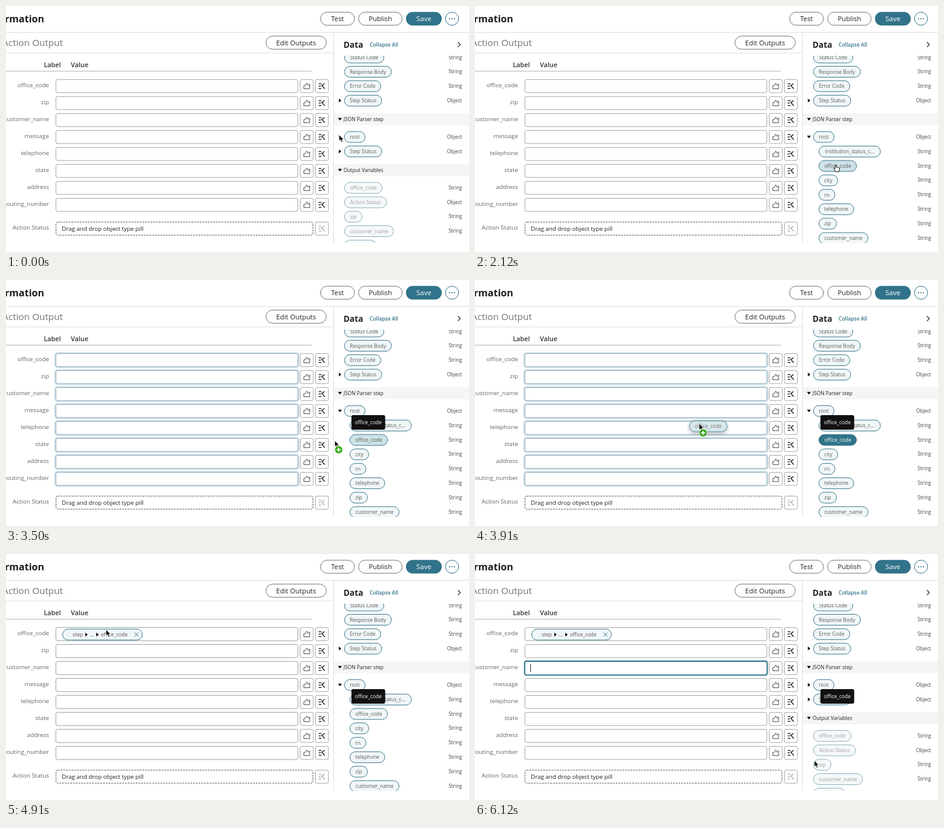
Recreate the animation shown at these times as an HTML page. Size 764 by 406 pixels, loop 6160 ms.

```html
<!DOCTYPE html>
<html lang="en">
<head>
<meta charset="utf-8">
<title>Action output mapping</title>
<style>
  html, body { margin: 0; width: 100%; height: 100%; overflow: hidden; background: #fff; }
  svg { display: block; font-family: "Open Sans", "Noto Sans", sans-serif; }
  .line { fill: none; stroke: #dedede; }
  .button { fill: #fff; stroke: #666; stroke-width: .9; }
  .field { fill: #fff; stroke: #a6a6a6; }
  .icon { fill: none; stroke: #333; }
  .pill rect { fill: #f1f6f8; stroke: #39788d; }
  .pill text { fill: #5c5c5c; }
  .off { opacity: .6; }
  .hover rect { fill: #cfe2e8; }
  .dark rect { fill: #31738a; }
  .dark text { fill: #fff; }
</style>
</head>
<body>
<svg id="stage" width="764" height="406" viewBox="0 0 764 406"></svg>
<script>
const LOOP = 6160, TEAL = '#31738a', STEP = 23.8;
const rect = (x, y, w, h, r, attrs = '') =>
  `<rect x="${x}" y="${y}" width="${w}" height="${h}" rx="${r}" ${attrs}/>`;
const text = (s, x, y, size, fill = '#222', anchor = 'start', weight = 400) =>
  `<text x="${x}" y="${y}" font-size="${size}" fill="${fill}" text-anchor="${anchor}" font-weight="${weight}">${s}</text>`;
const path = (d, attrs = '') => `<path d="${d}" ${attrs}/>`;
const group = (id, body, attrs = '') => `<g id="${id}" ${attrs}>${body}</g>`;
const triRight = (x, y) => path(`M${x - 1.7} ${y - 3.2}v6.4l4-3.2z`);
const triDown = (x, y, attrs) => path(`M${x - 3.2} ${y - 2}h6.4l-3.2 4.2z`, attrs);

const button = (s, x, y, w) =>
  rect(x, y, w, 21.6, 10.8, 'class="button"') + text(s, x + w / 2, y + 14.8, 11.3, '#222', 'middle');

const pill = (s, x, y, w, cls = '') =>
  `<g class="pill ${cls}" data-box="${x},${y},${w}">${rect(x, y - 9, w, 18, 9)}${text(s, x + w / 2, y + 3, 8.4, '', 'middle')}</g>`;
const row = (s, type, x, y, w, cls) =>
  pill(s, x, y, w, cls) + text(type, 752.5, y + 2.6, 8.2, '#444', 'end');
const bar = (s, y, id) =>
  rect(541, y - 10, 223, 20, 0, `fill="#f5f5f6" id="${id}"`) + triDown(551, y) + text(s, 557, y + 3.2, 8.35);

const wand = (y, color) => rect(510.5, y - 10.8, 21.5, 21.6, 2.5, 'class="field"') +
  path(`M516 ${y - 4}h4.5M516 ${y}h3.5M516 ${y + 4}h4.5M520.5 ${y - 2}l5.5 6.5M525.5 ${y - 4.5}l-4 4`,
    `class="icon" style="stroke:${color}" stroke-width="1.6"`);
const chart = y => rect(485.5, y - 10.8, 21.5, 21.6, 2.5, 'class="field"') +
  path(`M491.5 ${y - .5}v5h9.5v-8l-2.4 2.5-2.2-4-2.2 3.8z`, 'class="icon" stroke-width=".9"');

const labels = ['office_code', 'zip', 'customer_name', 'message', 'telephone', 'state', 'address', 'routing_number'];
const fieldY = i => 132.2 + 28 * i;
const formRow = (s, i) => {
  const y = fieldY(i);
  return text(s, 71, y + 1.7, 9.85, '#666', 'end') +
    rect(80.8, y - 12, 402.4, 24, 4, 'class="halo" fill="none" stroke="#cfe0e8" stroke-width="2"') +
    rect(82.3, y - 10.8, 399.4, 21.6, 3, 'class="field input"') + chart(y) + wand(y, '#333');
};

const children = [['institution_status_c...', 101.5], ['office_code', 62], ['city', 31], ['rn', 26.5],
  ['telephone', 57.5], ['zip', 29], ['customer_name', 81]];
const outputs = [['office_code', 62], ['Action Status', 69.5, 'Object'], ['zip', 29], ['customer_name', 81], ['message', 52]];

const page =
  text('Information', 63, 27, 16, '#1c1c1c', 'end', 700) +
  text('Action Output', 94, 66, 15.3, '#757575', 'end') +
  button('Test', 519, 10.2, 56) + button('Publish', 581.8, 10.2, 72) + button('Edit Outputs', 429, 49.7, 99.5) +
  rect(660, 9.8, 59, 22.4, 11.2, `fill="${TEAL}"`) + text('Save', 689.5, 25, 11.5, '#fff', 'middle') +
  `<circle cx="736" cy="21" r="10.8" fill="#fff" stroke="${TEAL}"/>` +
  [732, 736, 740].map(x => `<circle cx="${x}" cy="21" r="1.1" fill="${TEAL}"/>`).join('') +
  path('M0 43.5H764M0 77.5H540M540.5 43V391', 'class="line"') +
  path('M0 107.5H505', 'class="line" style="stroke:#b5b5b5"') +
  text('Label', 62.5, 100.8, 10.8, '#333', 'start', 600) + text('Value', 107, 100.8, 10.8, '#333', 'start', 600) +
  labels.map(formRow).join('') +
  text('Action Status', 71, 369, 9.85, '#666', 'end') +
  rect(82.5, 356.7, 424, 21.5, 3, 'fill="#fff" stroke="#555" stroke-dasharray="3 1.5"') +
  text('Drag and drop object type pill', 92, 371.2, 9.8) + wand(367.5, '#b8b8b8') +
  text('Data', 557, 68.6, 13.6, '#222', 'start', 700) +
  text('Collapse All', 600, 66.7, 8.5, TEAL, 'start', 600) +
  path('M745.7 59.5l4 4.2-4 4.2', 'class="icon" stroke-width="1.3"');

const list =
  row('Status Code', 'String', 558.5, 85, 65) + row('Response Body', 'String', 558.5, 108.5, 77.5) +
  row('Error Code', 'String', 558.5, 132.3, 60) + row('Step Status', 'Object', 558.5, 156.2, 61.5) +
  triRight(551, 156) + bar('JSON Parser step', 186.8, 'jsonBar') + row('root', 'Object', 558.5, 216.2, 34) +
  group('closed', triRight(551, 216) + triRight(551, 240) + row('Step Status', 'Object', 558.5, 240, 61.5) +
    bar('Output Variables', 270.8, 'outBar') +
    outputs.map(([s, w, type = 'String'], i) => row(s, type, 558.5, 300.2 + STEP * i, w, 'off')).join('')) +
  group('open', triDown(551, 216, 'id="rootTri"') +
    children.map(([s, w], i) => row(s, 'String', 567.5, 240.2 + STEP * i, w)).join(''));

const dropped = rect(93.5, 124, 131.5, 18, 9, 'fill="#f1f6f8" stroke="#39788d"') +
  text('step', 110, 136, 8.4, '#555') + triRight(132.5, 133) + text('...', 138.5, 136, 8.4, '#555') +
  triRight(150.7, 133) + text('office_code', 156.5, 136, 8.4, '#555') +
  path('M212 129.7l6.6 6.6m0-6.6l-6.6 6.6', `stroke="${TEAL}"`);
const focus = rect(82, -11.2, 400, 22.6, 3, `fill="#fff" stroke="${TEAL}" stroke-width="1.8" filter="url(#glow)"`) +
  path('M91.7 -7v14', 'stroke="#222"');
const pointer =
  group('arrow', path('M0 0v10l2.3-2 1.8 4 1.8-.8-1.8-3.8h3.2z', 'fill="#000" stroke="#fff" stroke-width=".7"')) +
  group('hand', path('M-1 1q1-1.6 2 0v3.6q1-.9 1.8.2 1-.7 1.8.4 1.9-.5 1.9 1.2v2.4l-1.2 3.2h-5l-3.4-5q.2-1.4 1.7-.3l.4.5z',
    'fill="#fff" stroke="#000" stroke-width=".95" stroke-linejoin="round"')) +
  group('plus', '<circle cx="6.5" cy="15" r="6.3" fill="#35a816" stroke="#fff" stroke-width=".6"/>' +
    path('M6.5 11.5v7M3 15h7', 'stroke="#fff" stroke-width="1.8"'));

stage.innerHTML = `<defs><clipPath id="clip"><path d="M541 82H764V391H541z"/></clipPath>
  <filter id="glow" x="-5%" y="-50%" width="110%" height="200%"><feDropShadow dx="0" dy="0" stdDeviation="1.6" flood-color="#7fb9c9"/></filter>
  <filter id="shade" x="-30%" y="-70%" width="160%" height="260%"><feDropShadow dx="0" dy="2" stdDeviation="3" flood-opacity=".4"/></filter></defs>` +
  page + group('focus', focus) + group('dropped', dropped) + group('panel', list, 'clip-path="url(#clip)"') +
  group('tip', rect(570, 223, 55.7, 24, 3, 'fill="#111"') + text('office_code', 597.8, 238.2, 8.4, '#fff', 'middle')) +
  group('ghost', pill('office_code', -16, 4, 62, 'hover'), 'opacity=".82" filter="url(#shade)"') +
  group('pointer', pointer);

const $ = id => document.getElementById(id);
const show = (id, on) => { $(id).style.display = on ? '' : 'none'; };
const clamp = v => Math.max(0, Math.min(1, v));
const ramp = (t, a, b) => clamp((t - a) / (b - a));
const within = (t, a, b) => t >= a && t < b;
const pills = [...document.querySelectorAll('#panel .pill:not(.off)')];
const sourcePill = document.querySelectorAll('#open .pill')[1];
const halos = document.querySelectorAll('.halo'), inputs = document.querySelectorAll('.input');

// time, x, y, bend of the path leading there
const route = [[0, 550, 213, 0], [370, 550, 213, 0], [600, 551, 217, 0], [910, 551, 217, 0], [2120, 595, 261.5, 0],
  [3200, 595, 261.5, 0], [4580, 164.5, 124.5, 190], [4790, 164.5, 124.5, 0], [5300, 169, 127, 0],
  [5450, 169, 127, 0], [6040, 560, 341, 0], [LOOP, 560, 341, 0]];

function cursorAt(t) {
  const i = route.findIndex(k => k[0] > t);
  const [t0, x0, y0] = route[i - 1], [t1, x1, y1, bend] = route[i];
  const u = (t - t0) / (t1 - t0), s = u * u * (3 - 2 * u);
  return [x0 + (x1 - x0) * s, y0 + (y1 - y0) * s + bend * s * (1 - s)];
}

function draw(t) {
  const [x, y] = cursorAt(t);
  const open = within(t, 450, 5000), dragging = within(t, 3250, 4790), lifted = within(t, 3560, 4790);
  const onTri = within(t, 370, 1600) && x < 555;
  let hovered = null;

  show('open', open);
  show('closed', !open);
  for (const p of pills) {
    const [px, py, w] = p.dataset.box.split(',').map(Number);
    const hit = open && t < 3250 && p.closest('#closed') === null && x > px && x < px + w && Math.abs(y - py) < 9;
    if (hit) hovered = p;
    p.classList.toggle('hover', hit || (p === sourcePill && dragging));
  }
  sourcePill.classList.toggle('dark', lifted);
  $('rootTri').setAttribute('fill', onTri ? TEAL : '#000');
  $('outBar').setAttribute('fill', within(t, 5000, 5500) ? '#e1e2e6' : '#f5f5f6');

  const lit = ramp(t, 3040, 3250) * (1 - ramp(t, 4790, 4950));
  halos.forEach(h => h.setAttribute('opacity', lit));
  inputs.forEach(f => { f.style.stroke = lit > .5 ? '#86a6b6' : ''; });

  const overField = within(t, 4400, 4830), nextField = t >= 5700;
  show('focus', overField || nextField);
  $('focus').setAttribute('transform', `translate(0 ${fieldY(nextField ? 2 : 0)})`);
  show('dropped', t >= 4830);
  show('tip', t >= 2500);
  show('ghost', lifted);
  $('ghost').setAttribute('transform', `translate(${x} ${y})`);

  const hand = onTri || hovered !== null;
  show('hand', hand);
  show('arrow', !hand);
  show('plus', dragging);
  $('pointer').setAttribute('transform', `translate(${x} ${y})`);
}

function tick() {
  draw(performance.now() % LOOP);
  requestAnimationFrame(tick);
}
tick();
</script>
</body>
</html>
```
